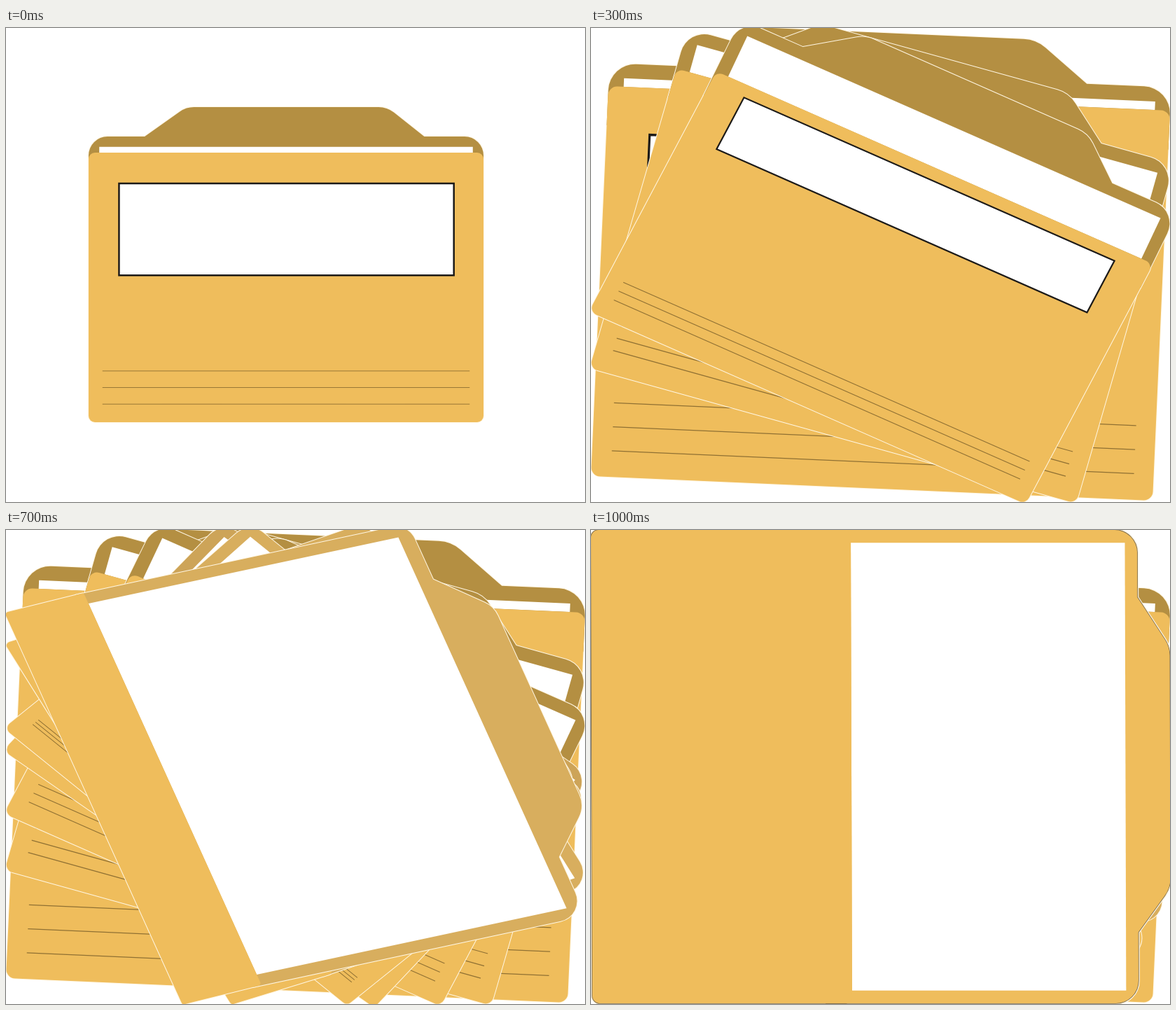
These frames come from a looping animation (827x677 px, 1.1 s). An HTML page with a canvas:

```html
<!DOCTYPE html>
<html>
<head>
<meta charset="utf-8">
<style>
html, body { margin: 0; width: 100%; height: 100%; overflow: hidden; background: #fff; }
canvas { display: block; }
</style>
</head>
<body>
<canvas id="stage" width="827" height="677"></canvas>
<script>
const ctx = document.getElementById('stage').getContext('2d');
const GOLD = '#efbd5c', DARK = '#b48f42', MID = '#cda458', LIGHT = '#d8ae5e';
const STEP = 100;

// o: hinge corner, u: along the hinge, v: front cover, b: back cover, t: tab
// label: top, bottom, line width; lines: first, spacing (fractions of v)
// gap: margin of the paper (fraction of the hinge)
const folders = [
  { o: [118, 178], u: [564, 0], v: [0, 385], b: [0, -23], t: [0, -42], back: DARK, label: [.114, .455, 2.5], lines: [.81, .0615] },
  { o: [25, 83], u: [802, 35], v: [-25, 557], b: [1.5, -33], t: [3, -60], back: DARK, label: [.12, .457, 3.2], lines: [.81, .0615] },
  { o: [122, 58], u: [695, 193], v: [-124, 428], b: [16, -57], t: [19, -54], back: DARK, label: [.08, .35, 2.6], lines: [.843, .041] },
  { o: [179, 62], u: [624, 275], v: [-182, 343], b: [35, -74], t: [24, -45], back: DARK, label: [.047, .262, 2.2], lines: [.85, .037] },
  { o: [207, 92], u: [530, 367], v: [-211, 223], b: [102, -104], t: [31, -43], back: MID, label: [.055, .2, 1.7], lines: [.845, .028] },
  { o: [197, 122], u: [490, 396], v: [-200, 161], b: [151, -134], t: [37, -39], back: LIGHT, label: [.066, .157, 1.3], lines: [.84, .02] },
  { o: [144, 117], u: [324, 516], v: [-146, 45], b: [371, -128], t: [52, -24], back: LIGHT, label: [.13, .2, 1.1], gap: .031 },
  { o: [111, 90], u: [254, 560], v: [-113, 28], b: [463, -99], t: [60, -20], back: LIGHT, gap: .034 },
  { o: [74, 56], u: [136, 614], v: [-75, 7], b: [583, -61], t: [66, -11], back: GOLD, front: '#e5b454', gap: .037 },
  { o: [205, 17], u: [65, 653], v: [-205, 7], b: [513, -19], t: [55, -3], back: GOLD },
  { o: [371, 0], u: [2, 676], v: [-371, 0], b: [409, 0], t: [46, 0], back: GOLD, rim: '#75664a' }
];

// Closed path through [x, y, corner radius] points
function shape(points) {
  const path = new Path2D();
  const last = points[points.length - 1], first = points[0];
  path.moveTo((last[0] + first[0]) / 2, (last[1] + first[1]) / 2);
  points.forEach((p, i) => {
    const next = points[(i + 1) % points.length];
    path.arcTo(p[0], p[1], next[0], next[1], p[2] || 0);
  });
  path.closePath();
  return path;
}

function outline(paths, color, width) {
  ctx.strokeStyle = color;
  ctx.lineWidth = width;
  paths.forEach(p => ctx.stroke(p));
}

function fill(path, color) {
  ctx.fillStyle = color;
  ctx.fill(path);
}

function drawFolder({ o, u, v, b, t, back, front = GOLD, label, lines, gap = .026, rim }) {
  const width = Math.hypot(...u), scale = width / 564;
  const at = (a, d, axis, r = 0, k = 0) =>
    [0, 1].map(i => o[i] + a * u[i] + d * axis[i] + k * t[i]).concat(r);
  const quad = (a, c, d, e, axis, r) =>
    shape([at(a, d, axis, r), at(c, d, axis, r), at(c, e, axis, r), at(a, e, axis, r)]);

  const rBack = 27 * scale, rTab = 35 * scale;
  const rFront = Math.min(9 * scale, Math.hypot(...v) / 30);
  const cover = shape([
    at(0, .1, v), at(0, 1, b, rBack), at(.142, 1, b),
    at(.247, 1, b, rTab, 1), at(.756, 1, b, rTab, 1),
    at(.85, 1, b), at(1, 1, b, rBack), at(1, .1, v)
  ]);
  const flap = quad(0, 1, 0, 1, v, rFront);

  outline([cover, flap], '#fff6e2', rim ? 4 : 2);
  if (rim) outline([cover, flap], rim, 1.6);
  fill(cover, back);
  fill(quad(.027, .973, 1 - gap * width / Math.hypot(...b), 0, b), '#fff');
  fill(flap, front);

  if (label) {
    const box = quad(.077, .925, label[0], label[1], v);
    fill(box, '#fff');
    outline([box], '#1c1a18', label[2]);
  }
  if (lines) {
    for (let i = 0; i < 3; i++) {
      const d = lines[0] + i * lines[1];
      const rule = new Path2D();
      rule.moveTo(...at(.035, d, v).slice(0, 2));
      rule.lineTo(...at(.965, d, v).slice(0, 2));
      outline([rule], '#8f7033', .9 * scale);
    }
  }
}

// The closed folder stands alone, then the opening poses pile up
function frame(now) {
  const n = Math.floor(now / STEP) % folders.length;
  ctx.fillStyle = '#fff';
  ctx.fillRect(0, 0, 827, 677);
  folders.slice(n ? 1 : 0, n + 1).forEach(drawFolder);
  requestAnimationFrame(frame);
}

frame(0);
</script>
</body>
</html>
```
